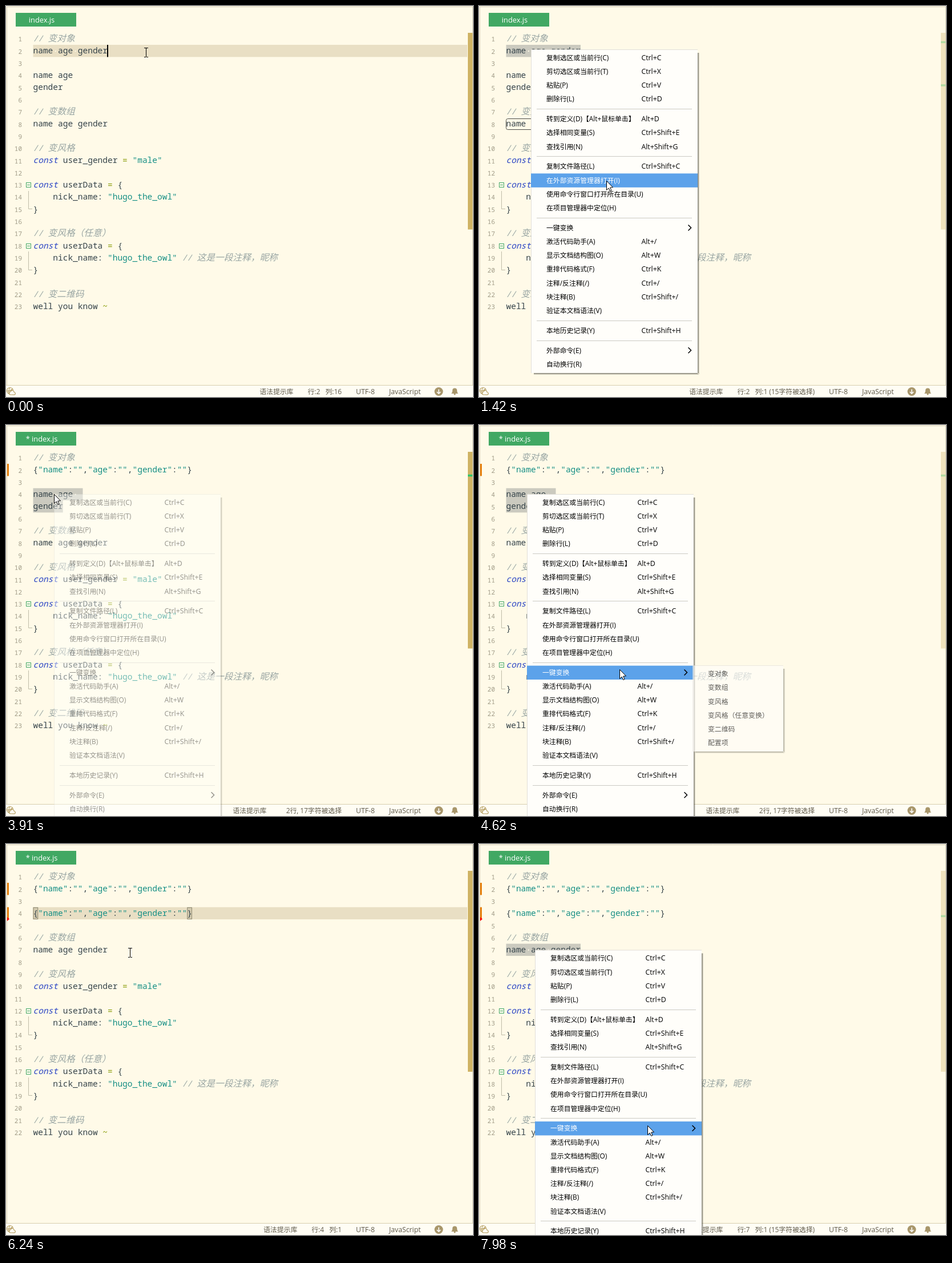
Write an HTML page with a canvas that moves like this. It is 818x685 px and loops after 8 s.

```html
<!DOCTYPE html>
<html lang="zh">
<head>
<meta charset="utf-8">
<title>index.js</title>
<style>
html, body { margin: 0; width: 100%; height: 100%; overflow: hidden; background: #fffae8; }
canvas { display: block; }
</style>
</head>
<body>
<canvas id="stage" width="818" height="685"></canvas>
<script>
const ctx = document.getElementById('stage').getContext('2d');
const LOOP = 8000, LEFT = 47.5, TOP = 46.7, ROW = 21.33, COL = 8.7;
const UI = '"Open Sans", "Noto Sans CJK SC", sans-serif';
const LABEL = '11.85px ' + UI, LATIN = '12.25px ' + UI;
const MONO = '14.5px "Noto Sans Mono", monospace';
const CJK = 'italic 300 15.7px "Noto Sans CJK SC", sans-serif';

// ---- documents ----
const words = 'name age gender', object = '{"name":"","age":"","gender":""}';
const tail = ['// 变数组', words, '', '// 变风格', 'const user_gender = "male"', '',
  'const userData = {', '    nick_name: "hugo_the_owl"', '}', '',
  '// 变风格（任意）', 'const userData = {',
  '    nick_name: "hugo_the_owl" // 这是一段注释，昵称', '}', '',
  '// 变二维码', 'well you know ~'];
const docs = [
  ['// 变对象', words, '', 'name age ', 'gender', '', ...tail],
  ['// 变对象', object, '', 'name age ', 'gender', '', ...tail],
  ['// 变对象', object, '', object, '', ...tail]];

// ---- menus: "-" is a separator, ">" opens a submenu ----
const items = `复制选区或当前行(C)|Ctrl+C
剪切选区或当前行(T)|Ctrl+X
粘贴(P)|Ctrl+V
删除行(L)|Ctrl+D
-
转到定义(D)【Alt+鼠标单击】|Alt+D
选择相同变量(S)|Ctrl+Shift+E
查找引用(N)|Alt+Shift+G
-
复制文件路径(L)|Ctrl+Shift+C
在外部资源管理器打开(I)
使用命令行窗口打开所在目录(U)
在项目管理器中定位(H)
-
一键变换|>
激活代码助手(A)|Alt+/
显示文档结构图(O)|Alt+W
重排代码格式(F)|Ctrl+K
注释/反注释(/)|Ctrl+/
块注释(B)|Ctrl+Shift+/
验证本文档语法(V)
-
本地历史记录(Y)|Ctrl+Shift+H
-
外部命令(E)|>
自动换行(R)`.split('\n');
const subItems = ['变对象', '变数组', '变风格', '变风格（任意变换）', '变二维码', '配置项'];
const menus = [
  { open: 900, sub: 1740, close: 2480, x: 91, y: 76 },
  { open: 3850, sub: 4530, close: 5420, x: 84, y: 121 },
  { open: 7060, sub: Infinity, close: Infinity, x: 98, y: 185.5 }];

// ---- selections made by dragging ----
const drags = [
  { from: 360, to: 700, until: 2600, row: 2, col: 15, endRow: 2 },
  { from: 3270, to: 3620, until: 5540, row: 5, col: 6, endRow: 4 },
  { from: 6370, to: 6690, until: Infinity, row: 7, col: 15, endRow: 7 }];

// ---- pointer path: time, x, y ----
const path = [
  [0, 245, 81], [50, 245, 81], [300, 180, 79], [360, 178, 79], [620, 50, 72], [700, 50, 72],
  [830, 91, 76], [960, 91, 76], [1420, 223, 306], [1680, 253, 388], [1780, 253, 388],
  [1980, 428, 389], [2490, 428, 389], [3000, 150, 165], [3210, 103, 145], [3280, 101, 145],
  [3580, 36, 121], [3650, 36, 121], [3830, 84, 121], [4130, 84, 121], [4400, 200, 385],
  [4620, 246, 428], [4670, 246, 428], [4850, 446, 433], [4960, 446, 433], [5040, 444, 435],
  [5860, 444, 435], [6240, 217, 190], [6360, 178, 186], [6600, 35, 183], [6690, 35, 183],
  [6880, 98, 185], [7120, 98, 185], [7390, 270, 410], [7560, 270, 410], [7750, 290, 484],
  [7910, 290, 484], [7980, 295, 493], [8000, 295, 493]];

const clamp = (v, a = 0, b = 1) => Math.min(b, Math.max(a, v));
const fade = (t, start, len = 145) => clamp((t - start) / len);
const rowTop = row => TOP + (row - 1) * ROW;
const colX = col => LEFT + col * COL;

function pointer(t) {
  const i = path.findIndex(p => p[0] > t);
  const [a, b] = [path[i - 1], path[i]], k = (t - a[0]) / (b[0] - a[0]);
  return { x: a[1] + (b[1] - a[1]) * k, y: a[2] + (b[2] - a[2]) * k };
}
function rect(x, y, w, h, color) {
  ctx.fillStyle = color;
  ctx.fillRect(x, y, w, h);
}
function line(color, width, ...pts) {
  ctx.strokeStyle = color;
  ctx.lineWidth = width;
  ctx.beginPath();
  pts.forEach(([x, y]) => ctx.lineTo(x, y));
  ctx.stroke();
}
function text(s, x, y, color, font = LABEL, align = 'left') {
  ctx.font = font;
  ctx.fillStyle = color;
  ctx.textAlign = align;
  ctx.fillText(s, x, y);
}
function dot(x, y, r, color) {
  ctx.fillStyle = color;
  ctx.beginPath();
  ctx.arc(x, y, r, 0, 7);
  ctx.fill();
}

// ---- editor ----
function drawCode(s, row) {
  const y = rowTop(row) + 15.2;
  for (const m of s.matchAll(/(\/\/ .*)|("[^"]*")|(const)|([=~])|[^ ]/g)) {
    const color = m[1] ? '#98a5a3' : m[2] ? '#168f85' : m[3] ? '#2a44c4' : m[4] ? '#859900' : '#36444a';
    const font = m[1] || m[3] ? 'italic ' + MONO : MONO;
    const chars = m[1] ? '//' : m[0];
    [...chars].forEach((c, i) => text(c, colX(m.index + i), y, color, font));
    if (m[1]) text(m[1].slice(3), colX(m.index + 3), y, color, CJK);
  }
}
function drawFold(s, row) {
  const y = Math.round(rowTop(row) + ROW / 2), grey = '#bfbca8';
  if (s.endsWith('= {')) {
    ctx.strokeStyle = '#43a867';
    ctx.lineWidth = 1;
    ctx.strokeRect(35.5, y - 3.5, 8, 8);
    line('#43a867', 1, [37, y + .5], [42, y + .5]);
  } else if (s.startsWith('    ')) line(grey, 1, [39.5, y - 11], [39.5, y + 11]);
  else if (s === '}') line(grey, 1, [39.5, y - 11], [39.5, y - .5], [46, y - .5]);
}
function drawDots(s, row, a, b) {
  for (let c = a; c < b; c++)
    if (s[c] === ' ') rect(colX(c) + 3.5, rowTop(row) + 10, 2, 2, '#fffae8');
}
function drawBracket(col, row) {
  rect(colX(col), rowTop(row), COL, ROW, '#d3caae');
  ctx.strokeStyle = '#918b74';
  ctx.lineWidth = 1;
  ctx.strokeRect(colX(col) + .5, rowTop(row) + .8, COL - 1, 20);
}
function drawChange(row) {
  rect(2, rowTop(row), 3, ROW, '#e67e0a');
}

function editorState(t, mouse) {
  const doc = t < 2600 ? 0 : t < 5540 ? 1 : 2;
  const drag = drags.find(d => t >= d.from && t < d.until);
  if (!drag) return { doc, caret: doc ? { row: doc * 2, col: 0 } : { row: 2, col: 15 } };
  const caret = { row: drag.endRow, col: 0 };
  if (t < drag.to) {
    caret.row = clamp(Math.floor((mouse.y - TOP) / ROW) + 1, drag.endRow, drag.row);
    caret.col = clamp(Math.round((mouse.x - LEFT) / COL), 0, docs[doc][caret.row - 1].length);
  }
  const back = caret.row < drag.row || caret.col < drag.col;
  return { doc, caret, sel: back && { row: drag.row, col: drag.col } };
}

function drawEditor({ doc, caret, sel }, menuOpen) {
  const lines = docs[doc], y = rowTop(caret.row);
  if (sel) {
    for (let r = caret.row; r <= sel.row; r++) {
      const s = lines[r - 1], a = r === caret.row ? caret.col : 0;
      const b = r === sel.row ? sel.col : s.length;
      const w = (b - a + (r < sel.row)) * COL;
      rect(colX(a), rowTop(r), w, ROW, menuOpen ? '#cbcabf' : '#b8d68c');
      drawDots(s, r, a, b);
    }
  } else {
    const s = lines[caret.row - 1];
    rect(LEFT, y, 760.5, ROW, '#e9dfc4');
    drawDots(s, caret.row, 0, s.length);
    if (doc && s === object) [0, s.length - 1].forEach(c => drawBracket(c, caret.row));
  }
  lines.forEach((s, i) => {
    text(i + 1, 28, rowTop(i + 1) + 15.5, '#a09b87', '11px "Noto Sans Mono", monospace', 'right');
    drawFold(s, i + 1);
    drawCode(s, i + 1);
  });
  if (!menuOpen && (sel || !doc)) rect(Math.round(colX(caret.col)) - 1, y, 2, ROW, '#000');
  if (sel && !doc && caret.col === 0) {
    ctx.strokeStyle = '#4a4a48';
    ctx.lineWidth = 1;
    ctx.beginPath();
    ctx.roundRect(47.5, 197.5, 130, 19, 3);
    ctx.stroke();
  }
  if (doc) drawChange(2);
  if (doc === 2) {
    drawChange(4);
    ctx.fillStyle = '#f00';
    ctx.beginPath();
    [[2, 128], [6, 131.5], [2, 135]].forEach(p => ctx.lineTo(...p));
    ctx.fill();
  }
}

function drawScrollbar(t, { doc, caret, sel }) {
  let dim = 0;
  for (const m of menus) dim += fade(t, m.open + 100, 120) - fade(t, m.close + 180, 90);
  ctx.globalAlpha = 1 - .67 * dim;
  rect(809, 47, 8, doc === 2 ? 352 : 344.5, '#cfb364');
  if (sel) {
    const rows = !doc && caret.col === 0 ? [2, 8] : [caret.row];
    rows.forEach(r => rect(809, 49 + (r - 1) * 12.6, 8, 3.5, '#2fc76b'));
  }
  ctx.globalAlpha = 1;
}

// ---- frame around the editor ----
function drawChrome(doc) {
  rect(0, 0, 818, 685, '#fffae8');
  line('#d8d1b9', 1, [817.5, 1.5], [1.5, 1.5], [1.5, 664]);
  line('#d8d1b9', 1, [817.5, 1], [817.5, 664]);
  rect(17, 12, 106, 24, '#41a863');
  text(doc ? '* index.js' : 'index.js', 62.5, 29, '#fff', '12.8px ' + UI, 'center');
}
function drawStatus({ caret, sel }) {
  const ink = '#5f594a', gold = '#b7a064', y = 680;
  rect(0, 664, 818, 21, '#fffdf4');
  rect(0, 664, 818, 1, '#d8cfb0');
  let place = `行:${caret.row}   列:${caret.col + 1}`;
  if (sel) place = sel.row > caret.row ? '   2行, 17字符被选择'
    : `${place} (${sel.col - caret.col}字符被选择)`;
  text(place, 588, y, ink, LABEL, 'right');
  text('语法提示库', 588 - ctx.measureText(place).width - 25, y, ink, LABEL, 'right');
  text('UTF-8', 613, y, ink, LATIN);
  text('JavaScript', 671, y, ink, LATIN);

  dot(758, 675.5, 7.5, '#a8966a');
  line('#fff', 1.6, [758, 671.5], [758, 679]);
  line('#fff', 1.6, [754.8, 676], [758, 679.2], [761.2, 676]);

  ctx.fillStyle = '#a8966a';
  ctx.beginPath();
  ctx.moveTo(780, 679);
  ctx.quadraticCurveTo(782, 677, 782, 674);
  ctx.arc(786, 673.5, 4, Math.PI, 0);
  ctx.quadraticCurveTo(790, 677, 792, 679);
  ctx.fill();
  dot(786, 680, 1.6, '#a8966a');

  ctx.strokeStyle = gold;
  ctx.lineWidth = 1.2;
  ctx.beginPath();
  ctx.arc(7, 674, 5.5, 1.6, 6.2);
  ctx.moveTo(2, 674);
  ctx.quadraticCurveTo(6, 676, 11, 671);
  ctx.moveTo(7, 669);
  ctx.quadraticCurveTo(3, 674, 6, 679);
  ctx.moveTo(8, 681);
  ctx.arc(8, 678.5, 2.5, 1.6, 4.5);
  ctx.arc(11, 676.5, 3, 3.6, 6);
  ctx.arc(14, 678.8, 2.3, 4.7, 1.6);
  ctx.closePath();
  ctx.stroke();
}

// ---- context menu ----
function drawPanel(x, y, w, h) {
  for (let i = 0; i < 3; i++) {
    const c = `rgba(70,70,60,${.62 - i * .2})`;
    rect(x + w + i, y + 6, 1, h - 6 + i, c);
    rect(x + 5, y + h + i, w - 5 + i, 1, c);
  }
  rect(x, y, w, h, '#fffefa');
  const edge = 'rgba(90,85,60,.18)';
  rect(x, y, w, 1, edge);
  rect(x, y + 1, 1, h - 1, edge);
}
function highlight(x, y, w) {
  rect(x, y - 11.9, w, 24.4, '#5ca2ea');
}
function drawMenu(t, { open, sub, x, y: menuY }, mouse) {
  const subAlpha = fade(t, sub), hit = y => Math.abs(mouse.y - y) < 12.1;
  ctx.globalAlpha = fade(t, open);
  drawPanel(x, menuY, 292, 567);
  let y = menuY + 14.5, subY;
  for (const item of items) {
    if (item === '-') {
      rect(x + 10, Math.round(y - 7), 272, 1, '#cbcac4');
      y += 10.6;
      continue;
    }
    const [label, key] = item.split('|'), parent = label === '一键变换';
    const hot = subAlpha ? parent : hit(y);
    if (parent) subY = Math.round(y - 12);
    if (hot) highlight(x, y, 292);
    text(label, x + 27, y + 4.3, hot ? '#fff' : '#000');
    if (key === '>') line('#000', 1.5, [x + 275.5, y - 5], [x + 280.5, y], [x + 275.5, y + 5]);
    else if (key) text(key, x + 193.5, y + 4.3, hot ? '#fff' : '#000', LATIN);
    y += 24.2;
  }
  if (subAlpha) {
    const sx = x + 290;
    ctx.globalAlpha = subAlpha;
    drawPanel(sx, subY, 159, 151);
    subItems.forEach((label, i) => {
      const cy = subY + 15 + i * 24.1, hot = mouse.x > sx && hit(cy);
      if (hot) highlight(sx, cy, 159);
      text(label, sx + 27, cy + 4.3, hot ? '#fff' : '#000');
    });
  }
  ctx.globalAlpha = 1;
}

function drawPointer({ x, y }, arrow) {
  x = Math.round(x);
  y = Math.round(y);
  if (arrow) {
    ctx.beginPath();
    [[0, 0], [0, 16], [3.7, 12.6], [6.2, 18], [8.6, 17], [6.2, 11.6], [11, 11.3]]
      .forEach(([a, b]) => ctx.lineTo(x + a + .5, y + b + .5));
    ctx.closePath();
    ctx.fillStyle = '#fff';
    ctx.fill();
    ctx.strokeStyle = '#000';
    ctx.lineWidth = 1;
    ctx.stroke();
  } else {
    rect(x, y - 8, 1, 16, '#000');
    [-8, 8].forEach(d => {
      rect(x - 3, y + d, 3, 1, '#000');
      rect(x + 1, y + d, 3, 1, '#000');
    });
  }
}

function draw(t) {
  const mouse = pointer(t), state = editorState(t, mouse);
  const menu = menus.find(m => t >= m.open && t < m.close);
  drawChrome(state.doc);
  drawEditor(state, menu);
  drawScrollbar(t, state);
  drawStatus(state);
  if (menu) drawMenu(t, menu, mouse);
  drawPointer(mouse, menus.some(m => t >= m.open - 20 && t < m.close + 60));
}

const start = performance.now();
function tick() {
  draw((performance.now() - start) % LOOP);
  requestAnimationFrame(tick);
}
tick();
</script>
</body>
</html>
```
